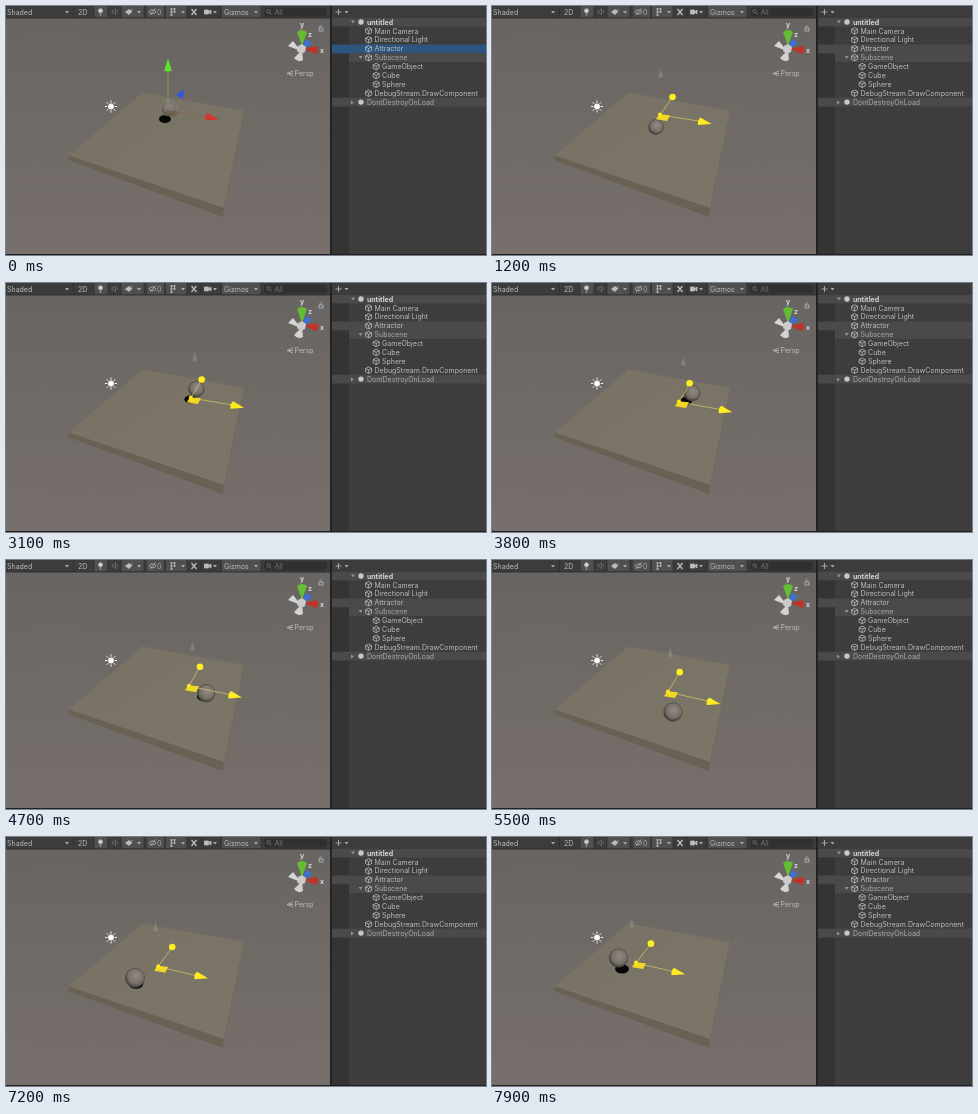
Recreate the animation shown at these times as an HTML page. Size 480 by 249 pixels, loop 8 s.

```html
<!DOCTYPE html>
<html lang="en">
<head>
<meta charset="utf-8">
<title>Scene view</title>
<style>
html, body { margin: 0; width: 100%; height: 100%; overflow: hidden; background: #3d3d3d; }
svg { display: block; width: 480px; height: 249px; }
text { font: 7px Inter, Roboto, sans-serif; fill: #bcbcbc; }
.bold { font-weight: 700; fill: #d4d4d4; }
.dim { fill: #a9a9a9; }
.line { fill: none; stroke: #bdbdbd; stroke-width: .8; }
</style>
</head>
<body>
<svg viewBox="0 0 480 249">
  <defs>
    <linearGradient id="sky" x2="0" y2="1">
      <stop stop-color="#676462"/><stop offset=".35" stop-color="#6f6965"/><stop offset="1" stop-color="#766f6b"/>
    </linearGradient>
    <linearGradient id="top" x2="1" y2="1">
      <stop stop-color="#777264"/><stop offset="1" stop-color="#7c7668"/>
    </linearGradient>
    <radialGradient id="ballFill" cx=".55" cy=".4" r=".62">
      <stop stop-color="#928b83"/><stop offset=".65" stop-color="#777069"/><stop offset="1" stop-color="#3b3834"/>
    </radialGradient>
    <clipPath id="view"><rect y="12" width="324" height="237"/></clipPath>
  </defs>

  <g clip-path="url(#view)">
    <rect y="12" width="324" height="237" fill="url(#sky)"/>
    <g id="grid" stroke="#8a8480" stroke-width=".6" opacity=".12"/>
    <path d="M63 149.500L136.500 86.500L238 105L218 202Z" fill="url(#top)"/>
    <path d="M63 149.500L218 202L217 211L62 154Z" fill="#686254"/>
    <path d="M218 202L238 105L236.500 117L217 211Z" fill="#6f695c"/>
    <g id="sun" stroke="#f4f4f0" stroke-width="1"><circle cx="105" cy="100.500" r="2.600" fill="#fff"/></g>

    <ellipse id="shadow" fill="#050505"/>
    <circle id="ball" fill="url(#ballFill)"/>
    <g id="handle" stroke-width=".9">
      <path id="yLine"/><path id="yCone"/>
      <path id="xLine"/><path id="zLine"/>
      <path id="plane" d="M-1 0L10 1L7 6.800L-4 5Z"/>
      <path id="xCone" d="M-4 -4.500Q-7.500 -2 -6.500 3L7 2Z"/>
      <circle id="hub" r="2" fill="#ffe51c"/>
      <circle id="zBall" r="3.300" fill="#ffee22"/>
      <path id="zCone" d="M-5 0L3 -4.500L2 3.500Q-1 4.500 -5 0Z" fill="#2d58d8"/>
    </g>

    <g id="compass">
      <path d="M295 45L287 35L282 40Z" fill="#d6d6d6"/>
      <path d="M296 44L297 54Q292 57 288 52Z" fill="#d2d2d2"/>
      <path d="M296 43L300 33L306 37Z" fill="#3d70df"/>
      <path d="M296 40L291 26Q296 22 301 26Z" fill="#64bd32"/>
      <path d="M298 43L311 40Q314 44 310 48Z" fill="#bd3429"/>
      <path d="M292 40L296 38L300 41L299 46L295 48L291 45Z" fill="#cbcbcb"/>
      <text class="bold" x="294" y="21">y</text>
      <text class="bold" x="302" y="31">z</text>
      <text class="bold" x="314" y="47">x</text>
    </g>
    <path d="M313 22h4v3h-4zM314 22v-1.500q1 -2 2 0" class="line"/>
    <path d="M287 65L281 67.500L287 70M283 67.500h4" class="line"/>
    <text x="288.500" y="70">Persp</text>
  </g>

  <rect width="324" height="12" fill="#3c3c3c"/>
  <path d="M88 0h14v11.500h-14zM115 0h23v11.500h-23zM141 0h17v11.500h-17zM160 0h21v11.500h-21zM216 0h39v11.500h-39z" fill="#505050"/>
  <path d="M67.500 0V12M88 0V12M102 0V12M115 0V12M138 0V12M159 0V12M181 0V12M195 0V12M215 0V12M255 0V12" stroke="#2c2c2c" stroke-width=".7"/>
  <path d="M0 12H324" stroke="#292929" stroke-width=".8"/>
  <text x="1" y="8.700">Shaded</text>
  <text x="72" y="8.700">2D</text>
  <text x="151" y="8.700" class="dim">0</text>
  <text x="218" y="8.700">Gizmos</text>
  <rect x="258" y="1.500" width="63" height="9" rx="3" fill="#303030"/>
  <g opacity=".5">
    <circle cx="262.500" cy="5.300" r="1.700" class="line"/>
    <path d="M263.700 6.700L265.500 8.500" class="line"/>
    <text x="268.500" y="8.700">All</text>
  </g>
  <g class="line">
    <circle cx="94.500" cy="4.800" r="2" fill="#d0d0d0"/><path d="M93.500 8h2M94 9.300h1"/>
    <path d="M106 4.700h1.500l2 -2v6l-2 -2h-1.500zM111 4q1 1.500 0 3" opacity=".4"/>
    <path d="M119.500 6l3.500 -2.500l3 2l-3 3zM126 3v1" fill="#bdbdbd"/>
    <path d="M143 5.800q3.500 -4 7 0q-3.500 4 -7 0M144 9L149.500 2.500"/>
    <path d="M164 3h6M164 6h6M164 9h3M165.500 2v8M168.500 2v5"/>
    <path d="M185.500 9L190.500 3M185.500 3L190.500 9" stroke-width="1.300"/>
    <path d="M198.500 4h4v4h-4zM202.500 6l2.500 -2v4z" fill="#bdbdbd"/>
  </g>
  <path id="arrows" fill="#aaa"/>

  <rect x="324" width="156" height="249" fill="#3d3d3d"/>
  <rect x="326" y="12" width="17" height="237" fill="#343434"/>
  <rect x="326" width="154" height="12" fill="#3c3c3c"/>
  <rect x="324" width="1.800" height="249" fill="#212121"/>
  <path d="M326 12H480" stroke="#292929" stroke-width=".8"/>
  <path d="M329.500 6h6M332.500 3v6" class="line"/>
  <path d="M338.500 5h4l-2 2.500z" fill="#aaa"/>
  <rect id="pick" x="326" y="38.500" width="154" height="8.800"/>
  <g id="tree"></g>
  <rect y="248" width="480" height="1" fill="#202020"/>
</svg>
<script>
const $ = id => document.getElementById(id);
const set = (id, attrs) => {
  for (const k in attrs) $(id).setAttribute(k, attrs[k]);
};
const put = (id, x, y) => set(id, { transform: `translate(${x} ${y})` });

// Static repeats
$('arrows').setAttribute('d', [61, 133, 177, 209, 250].map(x => `M${x - 2} 5h4l-2 2.500z`).join(''));

let rays = '', grid = '';
for (let i = 0; i < 8; i++) {
  const a = i * Math.PI / 4, c = Math.cos(a), s = Math.sin(a);
  rays += `<path d="M${105 + 3.8 * c} ${100.5 + 3.8 * s}L${105 + 6 * c} ${100.5 + 6 * s}"/>`;
}
for (let i = -5; i < 8; i++) {
  grid += `<path d="M0 ${95 + i * 36}L324 ${165 + i * 46}M${i * 58} 247L${150 + i * 37} 70"/>`;
}
$('sun').innerHTML += rays;
$('grid').innerHTML = grid;

// Hierarchy: label, depth, foldout, left edge of the lighter bar, text class
const rows = [
  ['untitled', 0, 'open', 326, 'bold'], ['Main Camera', 1], ['Directional Light', 1], ['Attractor', 1],
  ['Subscene', 1, 'open', 343, 'dim'], ['GameObject', 2], ['Cube', 2], ['Sphere', 2],
  ['DebugStream.DrawComponent', 1], ['DontDestroyOnLoad', 0, 'shut', 326, 'dim']
];
$('tree').innerHTML = rows.map(([label, depth, fold, left, style = ''], i) => {
  const y = 16 + i * 8.9, x = 355 + depth * 7.6;
  const bar = left ? `<rect x="${left}" y="${y - 4.4}" width="${480 - left}" height="8.800" fill="#4a4a4a"/>` : '';
  const icon = depth
    ? `<path class="line" d="M${x} ${y - 3.2}l3 1.500v3.400l-3 1.500l-3 -1.500v-3.400zm-3 1.500l3 1.500l3 -1.500m-3 1.500v3.400"/>`
    : `<circle cx="${x}" cy="${y}" r="2.700" fill="#c8c8c8"/>`;
  const tip = fold ? `<path fill="#929292" d="M${x - 10} ${y - 1.5}${fold === 'open' ? 'h4l-2 3z' : 'v4l3 -2z'}"/>` : '';
  return `${bar}${tip}${icon}<text x="${x + 5.9}" y="${y + 2.6}" class="${style}">${label}</text>`;
}).join('');

// Keys: time, then values
const originKeys = [
  [0, 162, 105], [450, 162, 105], [1200, 168, 109], [2300, 179, 111.5],
  [3800, 187, 119], [5500, 176, 132], [6400, 162, 133], [7900, 144, 126]
];
// x, y, radius, shadow x, shadow y
const ballKeys = [
  [0, 163, 102, 8, 159, 113], [1200, 164, 121, 7.4, 163, 124], [2300, 178, 107, 7.6, 173, 118],
  [3800, 200, 110, 8, 194, 118], [4500, 203, 128, 8.6, 200, 132], [5500, 181, 152, 9.2, 179, 154.5],
  [6400, 149.5, 155.5, 9.8, 149, 157], [7200, 129, 141, 9.6, 130, 147], [7900, 126.5, 121, 9.2, 130, 132]
];

// Cubic Hermite through the keys
function sample(keys, t) {
  let i = 0;
  while (i < keys.length - 2 && t > keys[i + 1][0]) i++;
  const a = keys[i], b = keys[i + 1], span = b[0] - a[0];
  const u = Math.min(1, (t - a[0]) / span), v = 1 - u;
  const slope = (k, c) => {
    const p = keys[Math.max(0, k - 1)], n = keys[Math.min(keys.length - 1, k + 1)];
    return (n[c] - p[c]) / (n[0] - p[0]);
  };
  return a.slice(1).map((p, c) =>
    p * v * v * (1 + 2 * u) + b[c + 1] * u * u * (3 - 2 * u) +
    span * u * v * (slope(i, c + 1) * v - slope(i + 1, c + 1) * u));
}

function draw(t) {
  const drag = t >= 450;
  const [ox, oy] = drag ? sample(originKeys, t) : [162, 105];
  const [bx, by, r, sx, sy] = sample(ballKeys, t);
  const dx = ox - 168, dy = oy - 109;
  const cx = ox + 44.5 + .1 * dx, cy = oy + 7 + .13 * dy;
  const zx = ox + 12.5 - .1 * dx, zy = oy - 18 - .08 * dy;
  const yx = drag ? ox + .2 * (dx + 3) : ox, yy = drag ? oy - 42 + .1 * dy : oy - 46;

  set('ball', { cx: bx, cy: by, r, stroke: drag ? '#45413c' : '#8d93a3', 'stroke-width': .6, opacity: drag ? 1 : .85 });
  set('shadow', { cx: sx, cy: sy, rx: r * .75, ry: r * .5 });
  set('pick', { fill: drag ? '#4a4a4a' : '#2c5680' });

  put('plane', ox, oy - .8);
  set('plane', { fill: drag ? '#f0d824' : '#655d43', opacity: drag ? 1 : .7 });
  put('hub', ox, oy - .5);
  put('xCone', cx, cy);
  set('xCone', { fill: drag ? '#ffeb20' : '#d5362b' });
  put('zBall', zx, zy);
  put('zCone', zx, zy + 1);
  for (const id of ['zBall', 'hub']) set(id, { visibility: drag ? 'visible' : 'hidden' });
  set('zCone', { visibility: drag ? 'hidden' : 'visible' });
  set('xLine', { d: `M${ox} ${oy}L${cx - 6} ${cy - 1}`, stroke: drag ? '#d3c56a' : '#a04a40', opacity: drag ? .85 : .25 });
  set('zLine', { d: `M${ox} ${oy}L${zx} ${zy}`, stroke: drag ? '#d3c56a' : '#4560b0', opacity: drag ? .85 : .35 });
  set('yLine', { d: `M${ox} ${oy - 8}L${yx} ${yy + 5}`, stroke: '#83b654', opacity: drag ? 0 : .65 });
  const w = drag ? 2.4 : 3.8, h = drag ? 4.8 : 6.5;
  set('yCone', {
    d: `M${yx} ${yy - h}L${yx + w} ${yy + h - 1}Q${yx} ${yy + h + 1} ${yx - w} ${yy + h - 1}Z`,
    fill: drag ? '#a09c96' : '#5ee332', opacity: drag ? .45 : 1
  });
}

function tick() {
  draw(performance.now() % 8000);
  requestAnimationFrame(tick);
}
tick();
</script>
</body>
</html>
```
